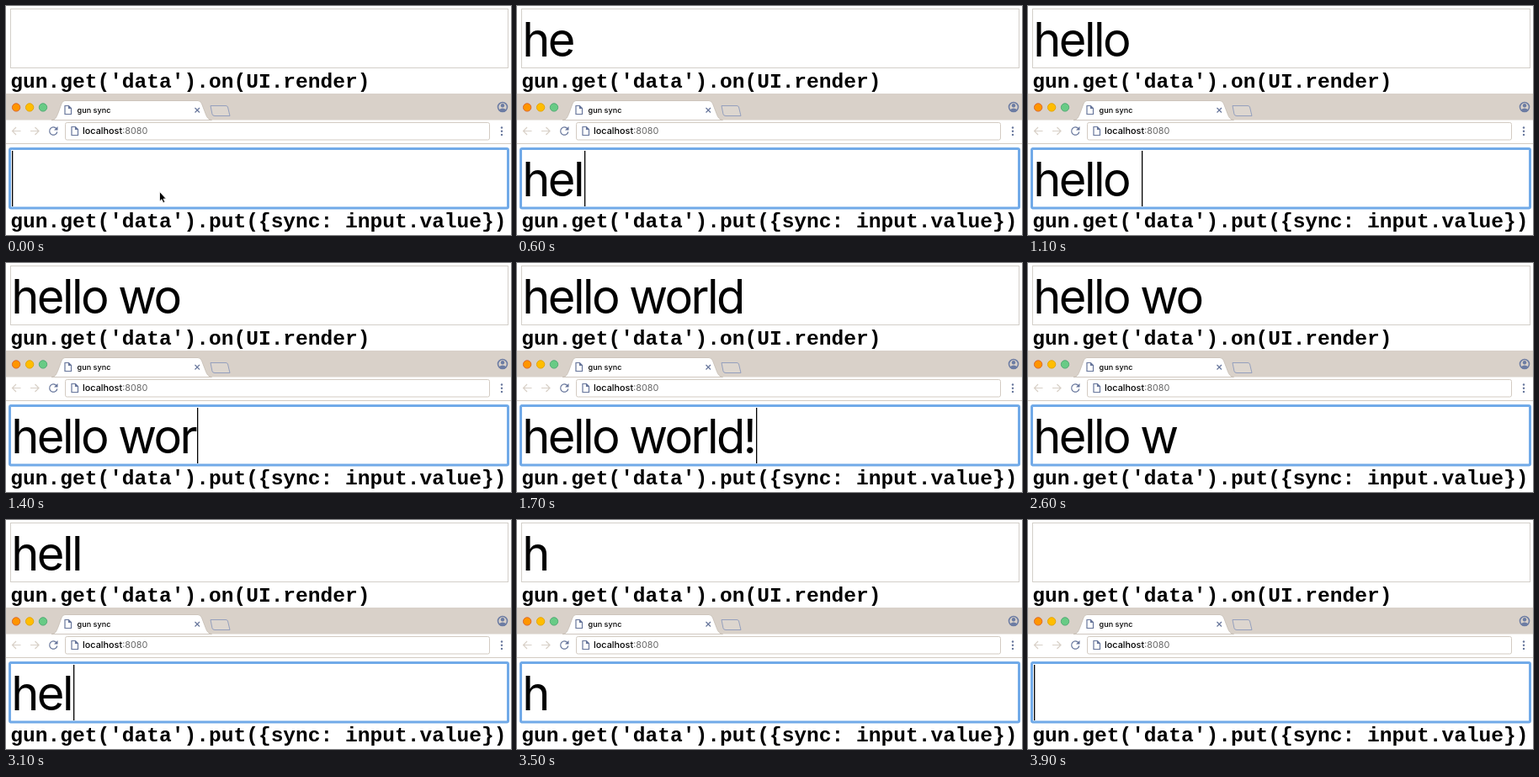
Recreate the animation shown at these times as an HTML page. Size 600 by 272 pixels, loop 4 s.

```html
<!DOCTYPE html>
<html lang="en">
<head>
<meta charset="utf-8">
<title>gun sync</title>
<style>
  html, body { margin: 0; width: 100%; height: 100%; overflow: hidden; background: #fff; }
  svg { display: block; width: 600px; height: 272px; }
  text { white-space: pre; font-family: Inter, sans-serif; font-optical-sizing: none; }
  .code { font: bold 24.55px "Liberation Mono", monospace; }
  .value { font-size: 56px; letter-spacing: -2.53px; }
  .line { fill: none; stroke: #66759b; stroke-width: 1.2; }
  .off { stroke: #d8d0c7; }
</style>
</head>
<body>
<svg viewBox="0 0 600 272">
  <rect x="5.5" y="3.5" width="591" height="70" fill="#fff" stroke="#d3cfc9"/>
  <text id="output" class="value" x="6.2" y="59.7"></text>
  <text class="code" x="5.3" y="97.3">gun.get('data').on(UI.render)</text>

  <!-- tab strip -->
  <rect y="104" width="600" height="31.5" fill="#d9d1c9"/>
  <path d="M54 135.5C59 135 60 132 62 127L66 116Q67.5 112.5 70 112.5H228Q231 112.5 232.5 116L237.5 129Q239.5 135 244.5 135.5Z" fill="#fff" stroke="#c6bdb3" stroke-width=".8"/>
  <g stroke-width=".9">
    <circle cx="12.1" cy="120.4" r="4.7" fill="#ff9500" stroke="#d9622e"/>
    <circle cx="28.1" cy="120.4" r="4.7" fill="#ffbd00" stroke="#e3a100"/>
    <circle cx="44" cy="120.4" r="4.7" fill="#68cb85" stroke="#4fa873"/>
  </g>
  <path d="M243 118.5H261Q263 118.5 263.5 120L266 130.5H248Q245.5 130.5 245 128.5Z" fill="#ddd6cf" stroke="#8d9abb" stroke-width=".9"/>
  <path id="page" class="line" d="M70 118.5H74.5L77.5 121.5V128.5H70ZM74.5 118.5V121.5H77.5"/>
  <text x="84.6" y="127" font-size="9.1" font-weight="500">gun sync</text>
  <path class="line" d="M224.5 121l5.500 5.500M230 121l-5.500 5.500"/>
  <circle cx="590" cy="120" r="5.5" fill="#d9d1c9" stroke="#6c7ca3" stroke-width="1.6"/>
  <circle cx="590" cy="118.3" r="2.2" fill="#6c7ca3"/>
  <path d="M585.5 123.500Q590 119.500 594.500 123.500Q590 128 585.500 123.500" fill="#6c7ca3"/>

  <!-- toolbar -->
  <path d="M0 163.5H600" stroke="#d3cbc2"/>
  <path class="line off" d="M17.5 148.5H7.5M12 144L7.5 148.5L12 153M29 148.5H39M34.5 144L39 148.5L34.5 153"/>
  <path class="line" d="M60 145.8A4.6 4.6 0 1 0 60.8 149.5"/>
  <path d="M61.5 143V147.5H57Z" fill="#66759b"/>
  <rect x="70.5" y="138.5" width="504" height="20.5" rx="2" fill="#fff" stroke="#d3cbc2"/>
  <use href="#page" x="8" y="25"/>
  <text x="91" y="152.3" font-size="10.85" font-weight="500">localhost<tspan fill="#666" font-weight="400">:8080</tspan></text>
  <g fill="#66759b">
    <circle cx="589" cy="144.5" r="1.2"/>
    <circle cx="589" cy="148.7" r="1.2"/>
    <circle cx="589" cy="152.9" r="1.2"/>
  </g>

  <!-- focused field -->
  <rect x="4.5" y="169.5" width="592" height="70.5" rx="1.5" fill="#fff" stroke="#71aae8" stroke-width="3"/>
  <text id="input" class="value" x="6.2" y="226.2"></text>
  <rect id="caret" y="172" width="1.3" height="66"/>
  <path id="mouse" d="M182.5 220.5V232L185 229.7L186.8 233.7L188.8 232.8L187 229H190.3Z" stroke="#fff" stroke-width=".8"/>
  <text class="code" x="5.3" y="263.3">gun.get('data').put({sync: input.value})</text>
</svg>
<script>
const LOOP = 4000, LAG = 100;
const message = 'hello world!';
const typed = [300, 500, 600, 700, 800, 1000, 1200, 1300, 1400, 1500, 1600, 1700];
const erased = [2100, 2200, 2300, 2500, 2600, 2700, 2800, 3000, 3100, 3300, 3400, 3600];
const [output, input, caret, mouse] =
  ['output', 'input', 'caret', 'mouse'].map(id => document.getElementById(id));

const count = (times, t) => times.filter(time => time <= t).length;
const valueAt = t => message.slice(0, count(typed, t) - count(erased, t));
const within = (t, from, to) => t >= from && t < to;
const show = (el, visible) => el.setAttribute('visibility', visible ? 'visible' : 'hidden');

function draw(now) {
  const t = now % LOOP;
  const value = valueAt(t);
  input.textContent = value;
  output.textContent = valueAt(t - LAG);
  caret.setAttribute('x', value ? Math.round(8 + input.getComputedTextLength()) : 7);
  show(caret, !within(t, 2500, 2900) && !within(t, 3500, 3700));
  show(mouse, t < typed[0]);
  requestAnimationFrame(draw);
}
draw(performance.now());
</script>
</body>
</html>
```
